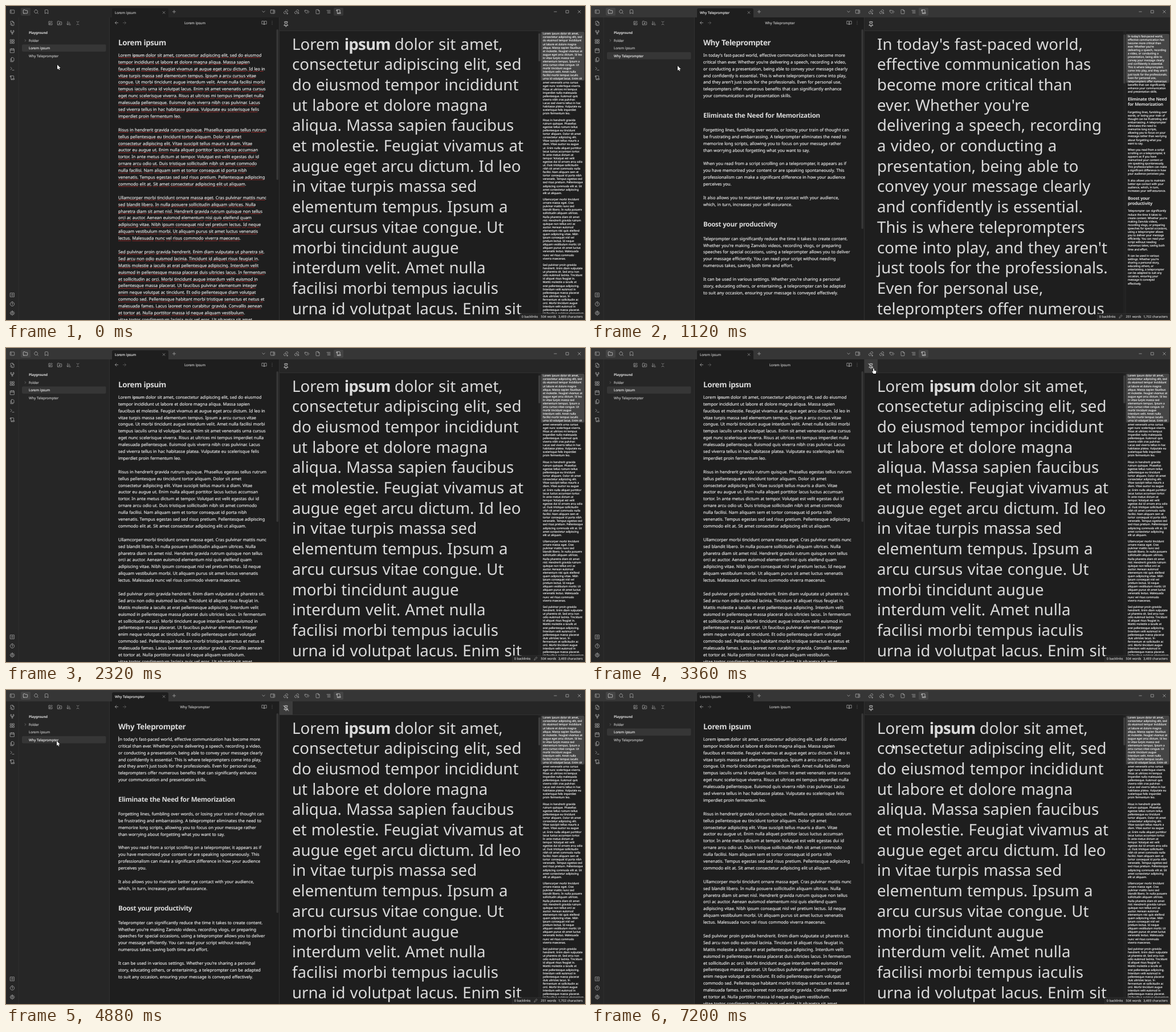
An HTML page with a canvas for the animation above (7.36 s loop, 1016 px wide and 551 px high).

```html
<!DOCTYPE html>
<html lang="en">
<head>
<meta charset="utf-8">
<title>Teleprompter notes</title>
<style>
html, body { margin: 0; width: 100%; height: 100%; overflow: hidden; background: #1e1e1e; }
canvas { display: block; }
</style>
</head>
<body>
<canvas id="stage" width="1016" height="551"></canvas>
<script>
const ctx = document.getElementById('stage').getContext('2d');
const LOOP = 7360, TICK = 40;
const TEXT = '#dadada', MUTED = '#b3b3b3', FAINT = '#666';
const BASE = '#1e1e1e', PANEL = '#262626', BAR = '#363636', HOVER = 'rgba(255,255,255,.075)';
const BODY = 7.937, BODY_STEP = 11.905, BIG = 29.76, BIG_STEP = 35.71, MAP_SCALE = 0.1706;

// Blocks: [editor y, minimap y, text, heading]. "|" starts an editor line, "/" a prompter line.
const lorem = {
  title: 'Lorem ipsum', words: 504, chars: '3,469', thumb: 264, promptThumb: [48, 49], viewTop: 45,
  blocks: [
    [86, 48.5, 'Lorem *ipsum* dolor sit amet, /consectetur adipiscing elit, sed /do eiusmod |tempor incididunt /ut labore et dolore magna /aliqua. Massa sapien |faucibus /et molestie. Feugiat vivamus at /augue eget arcu dictum. Id leo /in |vitae turpis massa sed /elementum tempus. Ipsum a /arcu cursus vitae |congue. Ut /morbi tincidunt augue /interdum velit. Amet nulla /facilisi morbi |tempus iaculis /urna id volutpat lacus. Enim sit /amet venenatis urna cursus |/eget nunc scelerisque viverra. /Risus at ultrices mi tempus /imperdiet nulla |malesuada /pellentesque. Euismod quis /viverra nibh cras pulvinar. /Lacus |sed viverra tellus in hac /habitasse platea. Vulputate eu /scelerisque felis |imperdiet /proin fermentum leo.'],
    [216.9, 200, 'Risus in hendrerit gravida /rutrum quisque. Phasellus /egestas tellus rutrum |tellus /pellentesque eu tincidunt /tortor aliquam. Dolor sit amet |/consectetur adipiscing elit. /Vitae suscipit tellus mauris a /diam. Vitae |auctor eu augue /ut. Enim nulla aliquet porttitor /lacus luctus accumsan |tortor. /In ante metus dictum at /tempor. Volutpat est velit /egestas dui id |ornare arcu odio /ut. Duis tristique sollicitudin /nibh sit amet commodo |nulla /facilisi. Nam aliquam sem et /tortor consequat id porta nibh |/venenatis. Tempus egestas sed /sed risus pretium. Pellentesque /adipiscing |commodo elit at. Sit /amet consectetur adipiscing /elit ut aliquam.'],
    [335.9, 339.3, 'Ullamcorper morbi tincidunt /ornare massa eget. Cras /pulvinar mattis nunc |sed /blandit libero. In nulla posuere /sollicitudin aliquam ultrices. /Nulla |pharetra diam sit amet /nisl. Hendrerit gravida rutrum /quisque non tellus |orci ac /auctor. Aenean euismod /elementum nisi quis eleifend /quam |adipiscing vitae. Nibh /ipsum consequat nisl vel /pretium lectus. Id neque |/aliquam vestibulum morbi. Ut /aliquam purus sit amet luctus /venenatis |lectus. Malesuada /nunc vel risus commodo /viverra maecenas.'],
    [431.1, 454.2, 'Sed pulvinar proin gravida /hendrerit. Enim diam vulputate /ut pharetra sit. |Sed arcu non /odio euismod lacinia. Tincidunt /id aliquet risus feugiat in. |/Mattis molestie a iaculis at /erat pellentesque adipiscing. /Interdum velit |euismod in /pellentesque massa placerat /duis ultricies lacus. In /fermentum |et sollicitudin ac /orci. Morbi tincidunt augue /interdum velit euismod in |/pellentesque massa placerat. /Ut faucibus pulvinar elementum /integer |enim neque volutpat ac tincidunt. Et odio pellentesque diam volutpat |commodo sed. Pellentesque habitant morbi tristique senectus et netus et |malesuada fames. Lacus laoreet non curabitur gravida. Convallis aenean |et tortor at. Nulla porttitor massa id neque aliquam vestibulum. |vitae tortor condimentum lacinia quis vel eros. Ut pharetra sit amet']
  ]
};
const why = {
  title: 'Why Teleprompter', words: 251, chars: '1,702', thumb: 350, promptThumb: [50, 86], viewTop: 49,
  blocks: [
    [86, 52.7, "In today's fast-paced world, /effective communication has /become more |critical than /ever. Whether you're /delivering a speech, recording /a video, |or conducting a /presentation, being able to /convey your message clearly |/and confidently is essential. /This is where teleprompters /come into play, |and they aren't /just tools for the professionals. /Even for personal use, |/teleprompters offer numerous /benefits that can significantly /enhance |your communication /and presentation skills."],
    [192, 163, 'Eliminate the Need /for Memorization', true],
    [217, 186, 'Forgetting lines, fumbling over /words, or losing your train of /thought can |be frustrating and /embarrassing. A teleprompter /eliminates the need to |/memorize long scripts, /allowing you to focus on your /message rather |than worrying /about forgetting what you /want to say.'],
    [276.6, 252, 'When you read from a script /scrolling on a teleprompter, it /appears as if |you have /memorized your content or /are speaking spontaneously. /This |professionalism can make /a significant difference in how /your audience |perceives you.'],
    [336, 306, 'It also allows you to maintain /better eye contact with your /audience, |which, in turn, /increases your self-assurance.'],
    [383, 337, 'Boost your /productivity', true],
    [407.8, 359.7, "Teleprompter can significantly /reduce the time it takes to /create content. |Whether you're /making Zanvido videos, /recording vlogs, or preparing |/speeches for special occasions, /using a teleprompter allows /you to deliver |your message /efficiently. You can read your /script without needing |/numerous takes, saving both /time and effort."],
    [479.2, 438, "It can be used in various /settings. Whether you're /sharing a personal |story, /educating others, or /entertaining, a teleprompter /can be adapted |to suit any /occasion, ensuring your /message is conveyed /effectively."]
  ]
};

const folder = 'M4 20h16a2 2 0 0 0 2-2V8a2 2 0 0 0-2-2h-8l-2-3H4a2 2 0 0 0-2 2v13a2 2 0 0 0 2 2z';
const link = 'M10 13a5 5 0 0 0 7.5.5l3-3a5 5 0 0 0-7-7l-1.7 1.7M14 11a5 5 0 0 0-7.5-.5l-3 3a5 5 0 0 0 7 7l1.7-1.7';
const pin = 'M12 17v5M9 10.8a2 2 0 0 1-1.1 1.8l-1.8.9A2 2 0 0 0 5 15.2V17h14v-1.8a2 2 0 0 0-1.1-1.8l-1.8-.9A2 2 0 0 1 15 10.8V6h1a2 2 0 0 0 0-4H8a2 2 0 0 0 0 4h1z';
const iconPaths = {
  panelLeft: 'M4 4h16a2 2 0 0 1 2 2v12a2 2 0 0 1-2 2H4a2 2 0 0 1-2-2V6a2 2 0 0 1 2-2zM7 8v8',
  panelRight: 'M4 4h16a2 2 0 0 1 2 2v12a2 2 0 0 1-2 2H4a2 2 0 0 1-2-2V6a2 2 0 0 1 2-2zM15 4v16M18 9h1M18 13h1',
  folder, pin, pinOff: pin + 'M2 2l20 20',
  folderPlus: folder + 'M12 10v6M9 13h6',
  search: 'M11 3a8 8 0 1 0 .01 0zM21 21l-4.3-4.3',
  bookmark: 'M19 21l-7-4-7 4V5a2 2 0 0 1 2-2h10a2 2 0 0 1 2 2z',
  down: 'M6 9l6 6 6-6', right: 'M9 6l6 6-6 6',
  linkIn: link + 'M16 21h6M19 18v6', linkOut: link + 'M16 22l6-5M18 17h4v4',
  tags: 'M9 5H2v7l6.3 6.3a2.4 2.4 0 0 0 3.4 0l3.6-3.6a2.4 2.4 0 0 0 0-3.4zM6 9v.01M15 5l6.3 6.3a2.4 2.4 0 0 1 0 3.4L17 19',
  file: 'M14 2H6a2 2 0 0 0-2 2v16a2 2 0 0 0 2 2h12a2 2 0 0 0 2-2V8zM14 2v6h6',
  list: 'M4 6h16M7 12h13M7 18h13',
  scroll: 'M8 21h12a2 2 0 0 0 2-2v-2H10v2a2 2 0 1 1-4 0V5a2 2 0 1 0-4 0v3h4M19 17V5a2 2 0 0 0-2-2H4',
  fileSearch: 'M10 22h8a2 2 0 0 0 2-2V8l-6-6H6a2 2 0 0 0-2 2v5M14 2v6h6M7 12a4 4 0 1 0 .01 0zM10 19l2 2',
  fork: 'M6 3a3 3 0 1 0 .01 0zM18 3a3 3 0 1 0 .01 0zM12 15a3 3 0 1 0 .01 0zM6 9v3h12V9M12 12v3',
  grid: 'M3 3h7v7H3zM14 3h7v7h-7zM3 14h7v7H3zM14 14h7v7h-7z',
  calendar: 'M3 4h18v18H3zM3 10h18M8 2v4M16 2v4',
  files: 'M15 2H8v16h12V7zM4 7v15h12',
  terminal: 'M4 17l6-6-6-6M12 19h8',
  vault: 'M3 3h18v18H3zM12 8a4 4 0 1 0 .01 0z',
  help: 'M12 2a10 10 0 1 0 .01 0zM9 9a3 3 0 1 1 3 4v1M12 17v.01',
  gear: 'M12 9a3 3 0 1 0 .01 0zM12 4a8 8 0 1 0 .01 0zM12 1v3M12 20v3M1 12h3M20 12h3M4 4l2 2M18 18l2 2M4 20l2-2M18 6l2-2',
  edit: 'M11 4H4v16h16v-7M18 3l3 3-9 9-4 1 1-4z',
  sort: 'M3 16l4 4 4-4M7 4v16M13 20h8M13 14h5M13 8h2',
  collapse: 'M7 20l5-5 5 5M7 4l5 5 5-5',
  back: 'M19 12H5M12 19l-7-7 7-7', forward: 'M5 12h14M12 5l7 7-7 7',
  book: 'M2 4h7a3 3 0 0 1 3 3v14a3 3 0 0 0-3-3H2zM22 4h-7a3 3 0 0 0-3 3v14a3 3 0 0 1 3-3h7z',
  dots: 'M12 5v.01M12 12v.01M12 19v.01',
  plus: 'M5 12h14M12 5v14', close: 'M6 6l12 12M18 6L6 18', minimize: 'M6 12h12', maximize: 'M6 6h12v12H6z',
  pencil: 'M17 3l4 4L8 20l-5 1 1-5z'
};
const icons = Object.fromEntries(Object.entries(iconPaths).map(([name, d]) => [name, new Path2D(d)]));
const arrow = new Path2D('M0 0v8.2l1.9-1.8 1.3 2.9 1.3-.6-1.3-2.8h2.6z');
const hand = new Path2D('M-.9 .9a.9.9 0 0 1 1.8 0v2.6l2.6.6q1 .3.9 1.4l-.6 3.5h-4.2l-2.6-3.4q.4-1.1 1.4-.5l.7.6z');
const beam = new Path2D('M-1.4-4h2.8M0-4v8M-1.4 4h2.8');

const iconRows = [
  ['panelLeft', 11, 10], ['folder', 34, 10, TEXT], ['search', 53, 10], ['bookmark', 71, 10],
  ['plus', 295, 10], ['close', 277, 11.5, MUTED, 7.5], ['down', 452, 10], ['panelRight', 468, 10],
  ['linkIn', 491, 10], ['linkOut', 510, 10], ['tags', 528, 10], ['file', 547, 10], ['list', 566, 10],
  ['scroll', 583.5, 10, TEXT], ['minimize', 964, 10], ['maximize', 985, 10], ['close', 1006, 10],
  ['edit', 78, 30], ['folderPlus', 94, 30], ['sort', 110, 30], ['collapse', 126, 30],
  ['back', 194, 29.5], ['forward', 208, 29.5, FAINT], ['book', 453, 29.5], ['dots', 467, 29.5],
  ['right', 34, 60.5, '#888', 6.5, 2.4],
  ...['fileSearch', 'fork', 'grid', 'calendar', 'files', 'terminal', 'scroll'].map((name, i) => [name, 11, 30.5 + 15.9 * i]),
  ...['vault', 'help', 'gear'].map((name, i) => [name, 11, 507 + 15.9 * i])
];

// Pointer path: time, x, y
const pointerKeys = [
  [0, 90, 103], [40, 90, 103], [160, 89, 90], [640, 89, 90], [900, 200, 122], [1120, 152, 105],
  [1400, 71, 77.5], [1920, 71, 77.5], [2640, 494, 45], [2800, 496, 36], [3360, 496, 36],
  [4080, 95, 104], [4240, 89, 89.5], [4880, 89, 89.5], [5160, 66, 76], [5720, 66, 76],
  [6120, 363, 131], [6440, 482, 73], [6640, 494, 36], [6860, 494, 36], [7200, 529, 95], [LOOP, 529, 95]
];
const focusSpans = [[400, 1560], [1720, 2920], [4400, 5320], [5520, 6720]];

const between = (t, from, to) => t >= from && t < to;

function tangent(i, axis) {
  const prev = pointerKeys[i - 1], key = pointerKeys[i], next = pointerKeys[i + 1];
  if (!prev || !next || prev[axis] === key[axis] || next[axis] === key[axis]) return 0;
  return (next[axis] - prev[axis]) / (next[0] - prev[0]);
}

function pointerAt(t) {
  const i = pointerKeys.findIndex((key, n) => n && t < key[0]) - 1;
  const a = pointerKeys[i], b = pointerKeys[i + 1], span = b[0] - a[0], u = (t - a[0]) / span;
  return [1, 2].map(axis => {
    const bend = u * u * (3 - 2 * u);
    return a[axis] + (b[axis] - a[axis]) * bend
      + span * (u * (1 - u) ** 2 * tangent(i, axis) - u * u * (1 - u) * tangent(i + 1, axis));
  });
}

function box(x, y, w, h, color, radius = 0) {
  ctx.fillStyle = color;
  ctx.beginPath();
  ctx.roundRect(x, y, w, h, radius);
  ctx.fill();
}

function setFont(size, weight) {
  ctx.font = `${weight} ${size * 0.93}px "Noto Sans", "Open Sans", sans-serif`;
  ctx.wordSpacing = `${size * 0.032}px`;
  ctx.letterSpacing = `${weight > 400 ? size * -0.028 : 0}px`;
}

function text(str, x, y, size, color = TEXT, weight = 400, align = 'left') {
  setFont(size, weight);
  ctx.fillStyle = ctx.strokeStyle = color;
  ctx.textAlign = align;
  ctx.fillText(str, x, y);
  // Small type gets a hairline so that it stays as bright as on screen.
  const scale = ctx.getTransform().a;
  if (size * scale < 10 && weight === 400) {
    ctx.lineWidth = 0.22 / scale;
    ctx.lineJoin = 'round';
    ctx.strokeText(str, x, y);
  }
  return ctx.measureText(str).width;
}

function richText(line, x, y, size, weight = 400) {
  line.split('*').forEach((part, i) => {
    if (part) x += text(part, x, y, size, TEXT, i % 2 ? 600 : weight);
  });
}

function icon(name, x, y, color = MUTED, size = 8.9, weight = 1.9) {
  ctx.save();
  ctx.translate(x - size / 2, y - size / 2);
  ctx.scale(size / 24, size / 24);
  ctx.strokeStyle = color;
  ctx.lineWidth = weight;
  ctx.lineCap = ctx.lineJoin = 'round';
  ctx.stroke(icons[name]);
  ctx.restore();
}

function clipped(x, y, w, h, draw) {
  ctx.save();
  ctx.beginPath();
  ctx.rect(x, y, w, h);
  ctx.clip();
  draw();
  ctx.restore();
}

function underline(line, x, y) {
  setFont(BODY, 400);
  ctx.fillStyle = 'rgba(205,45,45,.85)';
  for (const word of line.replaceAll('*', '').split(' ')) {
    const width = ctx.measureText(word).width;
    ctx.fillRect(x, y + 1.5, width, 0.75);
    x += width + ctx.measureText(' ').width;
  }
}

function drawEditor(doc, misspelled, caret) {
  text(doc.title, 197, 68.8, 14.5, TEXT, 700);
  for (const [y, , str, heading] of doc.blocks) {
    const lines = str.replaceAll('/', '').split(' |');
    lines.forEach((line, i) => {
      const baseline = y + (heading ? 4 : 2.8) + i * BODY_STEP;
      if (heading) richText(line, 197, baseline, 12.5, 600);
      else richText(line, 197, baseline, BODY);
      if (misspelled) underline(line, 197, baseline);
    });
  }
  if (caret) box(197, 81, 0.6, 9.5, TEXT);
  box(474.5, 41, 3.5, doc.thumb, '#363636', 1.5);
}

function drawPrompt(doc, x, y, scale) {
  const top = doc.blocks[0][1];
  ctx.save();
  ctx.translate(x, y);
  ctx.scale(scale, scale);
  for (const [, mapY, str, heading] of doc.blocks) {
    str.replaceAll('|', '').split(' /').forEach((line, i) => {
      const offset = (mapY - top) / MAP_SCALE;
      if (heading) richText(line, 0, offset + 5 + i * 55, 47.3, 600);
      else richText(line, 0, offset + i * BIG_STEP, BIG);
    });
  }
  ctx.restore();
}

function drawFrame(fileTree, hovered, windowActive) {
  box(0, 0, 1016, 551, BASE);
  box(0, 0, 1016, 20, windowActive ? BAR : PANEL);
  box(0, 20, 181, 531, PANEL);
  box(480, 20, 536, 23.5, PANEL);
  box(21.7, 20, 0.6, 531, BAR);
  box(181, 20, 0.8, 531, BAR);
  box(479, 20, 0.8, 531, BAR);
  box(480, 43.3, 536, 0.6, BAR);
  box(186, 4, 99, 16, BASE, [3, 3, 0, 0]);
  box(26, 3, 17, 14, HOVER, 2);
  box(575, 3, 17, 14, HOVER, 2);
  iconRows.forEach(row => icon(...row));
  text('Playground', 40, 49.4, 6.5, TEXT, 600);
  text('Folder', 40, 62.8, 6.45, MUTED);
  [lorem, why].forEach((doc, i) => {
    const lit = doc === fileTree || i === hovered;
    if (lit) box(28, 67.6 + 13.4 * i, 147.5, 12.4, HOVER, 2);
    text(doc.title, 40, 76.2 + 13.4 * i, 6.45, lit ? TEXT : MUTED);
  });
}

function drawStatus(words, chars, editing) {
  const left = editing ? 888 : 901;
  box(left, 539.5, 1016 - left, 11.5, BAR, [3, 0, 0, 0]);
  box(left + 0.5, 540, 1016 - left, 11, PANEL, [3, 0, 0, 0]);
  const item = (str, right) => text(str, right, 546.8, 5.95, MUTED, 400, 'right');
  item('0 backlinks', editing ? 920.5 : 933.5);
  item(`${words} words`, 965.5);
  item(`${chars} characters`, 1012);
  if (editing) icon('pencil', 929.5, 545, MUTED, 7);
}

function drawPointer(x, y, overPin) {
  const overText = between(x, 190, 474) && y > 50;
  ctx.save();
  ctx.translate(x, y);
  ctx.lineJoin = 'round';
  if (overText) {
    ctx.lineWidth = 0.7;
    ctx.strokeStyle = '#ccc';
    ctx.stroke(beam);
  } else {
    const shape = overPin ? hand : arrow;
    ctx.lineWidth = 0.9;
    ctx.strokeStyle = '#000';
    ctx.stroke(shape);
    ctx.fillStyle = '#fff';
    ctx.fill(shape);
  }
  ctx.restore();
}

function render(t) {
  const doc = between(t, 400, 1720) || between(t, 4400, 5520) ? why : lorem;
  const prompt = between(t, 640, 1920) ? why : lorem;
  const counted = between(t, 640, 1920) || between(t, 4640, 5720) ? why : lorem;
  const pinned = between(t, 3080, 6860);
  const focus = focusSpans.find(span => between(t, ...span));
  const caret = focus && (t - focus[0]) % 1060 < 530;
  const [x, y] = pointerAt(t);
  const overPin = between(x, 480, 503) && between(y, 20, 43);
  const hovered = between(x, 28, 175) && between(y, 67.5, 94.5) ? Math.floor((y - 67.5) / 13.5) : -1;

  ctx.textRendering = 'geometricPrecision';
  drawFrame(doc, hovered, t >= 320);
  text(doc.title, 191, 13.8, 6.45, focus ? TEXT : MUTED);
  text(doc.title, 331.5, 31.8, 6.45, MUTED, 400, 'center');
  clipped(182, 40, 297, 511, () => drawEditor(doc, t < 400, caret));

  if (pinned || overPin) box(480, 20, 23, 23.3, 'rgba(255,255,255,.1)');
  icon(pinned ? 'pinOff' : 'pin', 491.3, 32, TEXT, 11, 2);

  clipped(480, 44, 454, 507, () => drawPrompt(prompt, 502, 76.5, 1));
  box(934, 44, 4, 507, '#222');
  box(938, 44, 0.6, 507, '#2c2c2c');
  box(934.2, prompt.promptThumb[0], 3.5, prompt.promptThumb[1], '#3f3f3f', 1.5);
  box(938.8, prompt.viewTop, 76, 85.8, '#454545', 2);
  clipped(938, 44, 78, 507, () => drawPrompt(prompt, 942, prompt.blocks[0][1] + 1.8, MAP_SCALE));

  drawStatus(counted.words, doc.chars, Boolean(focus));
  drawPointer(x, y, overPin);
}

let lastTick = -1;
function loop(now) {
  const tick = Math.floor((now % LOOP) / TICK);
  if (tick !== lastTick) render(tick * TICK);
  lastTick = tick;
  requestAnimationFrame(loop);
}
requestAnimationFrame(loop);
</script>
</body>
</html>
```
